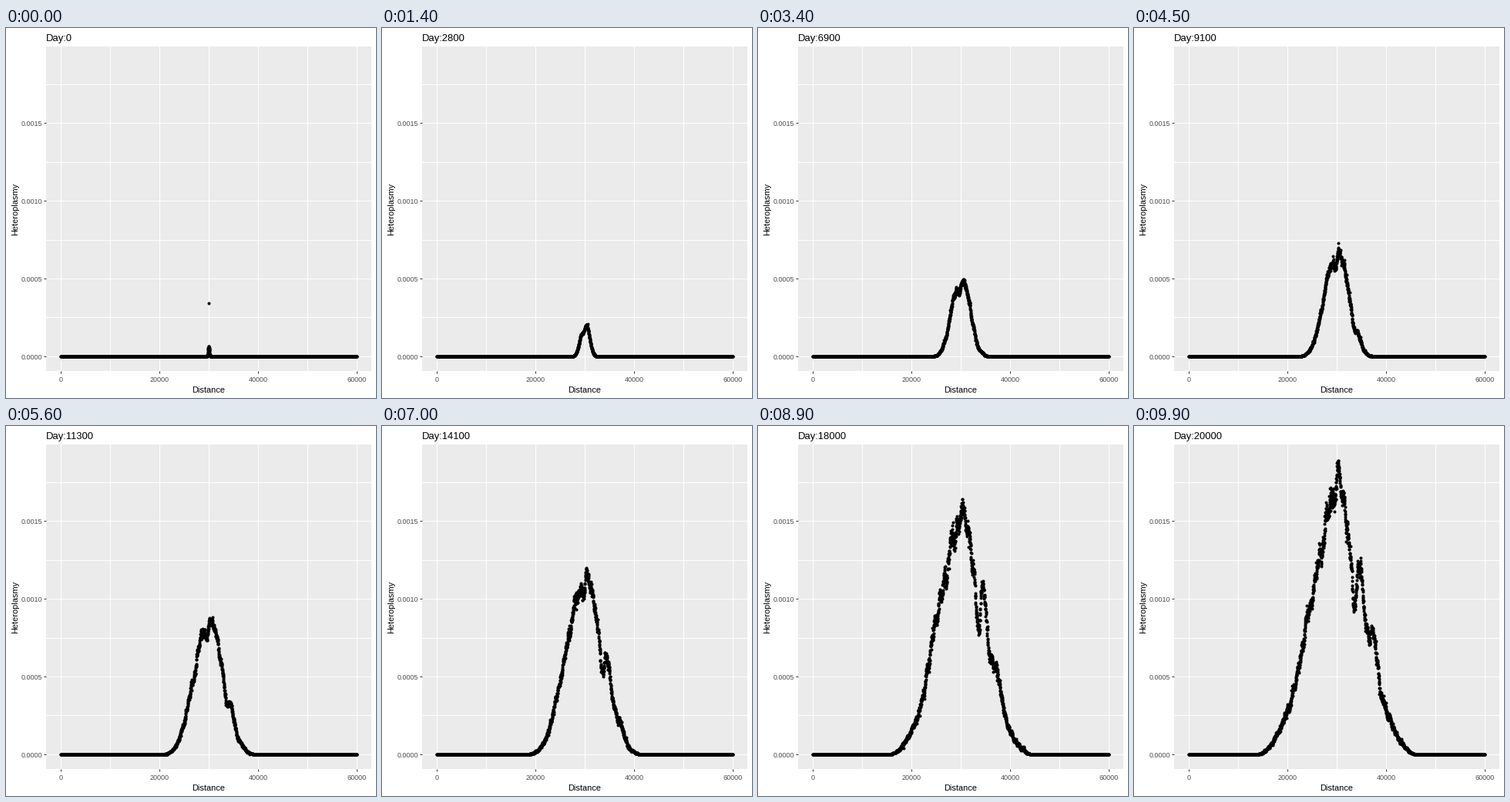
These frames come from a looping animation (480x480 px, 10 s). A matplotlib script:

```python
import numpy as np
import matplotlib.pyplot as plt
from matplotlib.animation import FuncAnimation

plt.rcParams["font.family"] = "Liberation Sans"

SIZE, DPI, FRAMES = 480, 72, 100
LAST_DAY = 20000
LEFT, TOP, WIDTH, HEIGHT = 52, 24, 422, 421
X_MAX, Y_MAX = 60, 18.97      # distance / 1e3, heteroplasmy * 1e4
PAD = 0.05

# Lasting local drift of the wave: (centre, width, relative gain)
DRIFT = [(23.8, 0.9, 0.12), (33.4, 0.6, -0.2), (34.7, 0.6, 0.2),
         (37.6, 0.9, 0.25)]

x = np.linspace(0, X_MAX, 3001)
MID = len(x) // 2


def bump(centre, width):
    return np.exp(-((x - centre) / width) ** 2)


def smooth_noise(rng, span):
    return np.convolve(rng.normal(size=x.size), np.hanning(span), "same") \
        / np.sqrt(0.375 * span)


rng = np.random.default_rng(7)
terrain = 1 + sum(g * bump(c, w) for c, w, g in DRIFT) + 0.03 * smooth_noise(rng, 50)
coarse_a, coarse_b = smooth_noise(rng, 24), smooth_noise(rng, 24)


def levels(i):
    """Heteroplasmy along the fibre: a bell that widens and grows."""
    t = i / (FRAMES - 1)
    reach = 0.4 + 15.4 * t
    height = 0.6 + 10.2 * t + 6.9 * t ** 2
    u = np.minimum(np.abs(x - 30) / reach, 1)
    bell = np.exp(-(u / 0.55) ** (2.4 - t ** 2)) * (1 - u ** 2) ** 1.2
    notch = 1 - 0.38 * np.exp(-2.2 * t) * min(1, 10 * t) * bump(29.7, 0.6)
    y = height * bell * terrain * notch

    fine = np.random.default_rng(i).standard_t(6, x.size)
    coarse = np.cos(0.25 * i) * coarse_a + np.sin(0.25 * i) * coarse_b
    y = np.maximum(y + 0.09 * np.sqrt(y * t) * (0.65 * fine + 0.8 * coarse), 0)
    y[MID] += 2.8 * np.exp(-1.5 * i)      # the first mutant
    return y


fig = plt.figure(figsize=(SIZE / DPI, SIZE / DPI), dpi=DPI, facecolor="white")
ax = fig.add_axes([LEFT / SIZE, 1 - (TOP + HEIGHT) / SIZE,
                   WIDTH / SIZE, HEIGHT / SIZE], facecolor="#EBEBEB")
ax.set(xlim=(-PAD * X_MAX, (1 + PAD) * X_MAX),
       ylim=(-PAD * Y_MAX, (1 + PAD) * Y_MAX))
ax.spines[:].set_visible(False)
ax.set_axisbelow(True)
x_ticks, y_ticks = np.arange(0, 61, 20), np.arange(0, 16, 5)
ax.set_xticks(x_ticks, labels=[])
ax.set_yticks(y_ticks, labels=[])
ax.set_xticks(x_ticks[:-1] + 10, minor=True)
ax.set_yticks(y_ticks + 2.5, minor=True)
ax.grid(which="both", color="white", lw=1)
ax.tick_params(which="major", length=3, width=1, color="#333333")
ax.tick_params(which="minor", length=0)


def put(px, py, s, size, color="black", ha="center", rotation=0):
    return fig.text(px / SIZE, 1 - py / SIZE, s, size=size, color=color, ha=ha,
                    va="baseline", rotation=rotation, rotation_mode="anchor")


for v in x_ticks:
    px, _ = ax.transData.transform((v, 0))
    put(px, 459, str(v * 1000), 9, "#4D4D4D")
for v in y_ticks:
    _, py = ax.transData.transform((0, v))
    put(47, SIZE - py + 4, f"{v / 1e4:.4f}", 9, "#4D4D4D", ha="right")
put(263, 473, "Distance", 11)
put(15, 235, "Heteroplasmy", 11, rotation=90)
title = put(LEFT, 17, "", 13, ha="left")

dots, = ax.plot([], [], "o", color="black", ms=4, mew=0, zorder=3)


def update(i):
    day = round(LAST_DAY * i / (FRAMES - 1) / 100) * 100
    title.set_text(f"Day:{day}")
    dots.set_data(x, levels(i))
    return dots, title


anim = FuncAnimation(fig, update, frames=FRAMES, interval=100, repeat=True,
                     repeat_delay=0)
plt.show()
```
